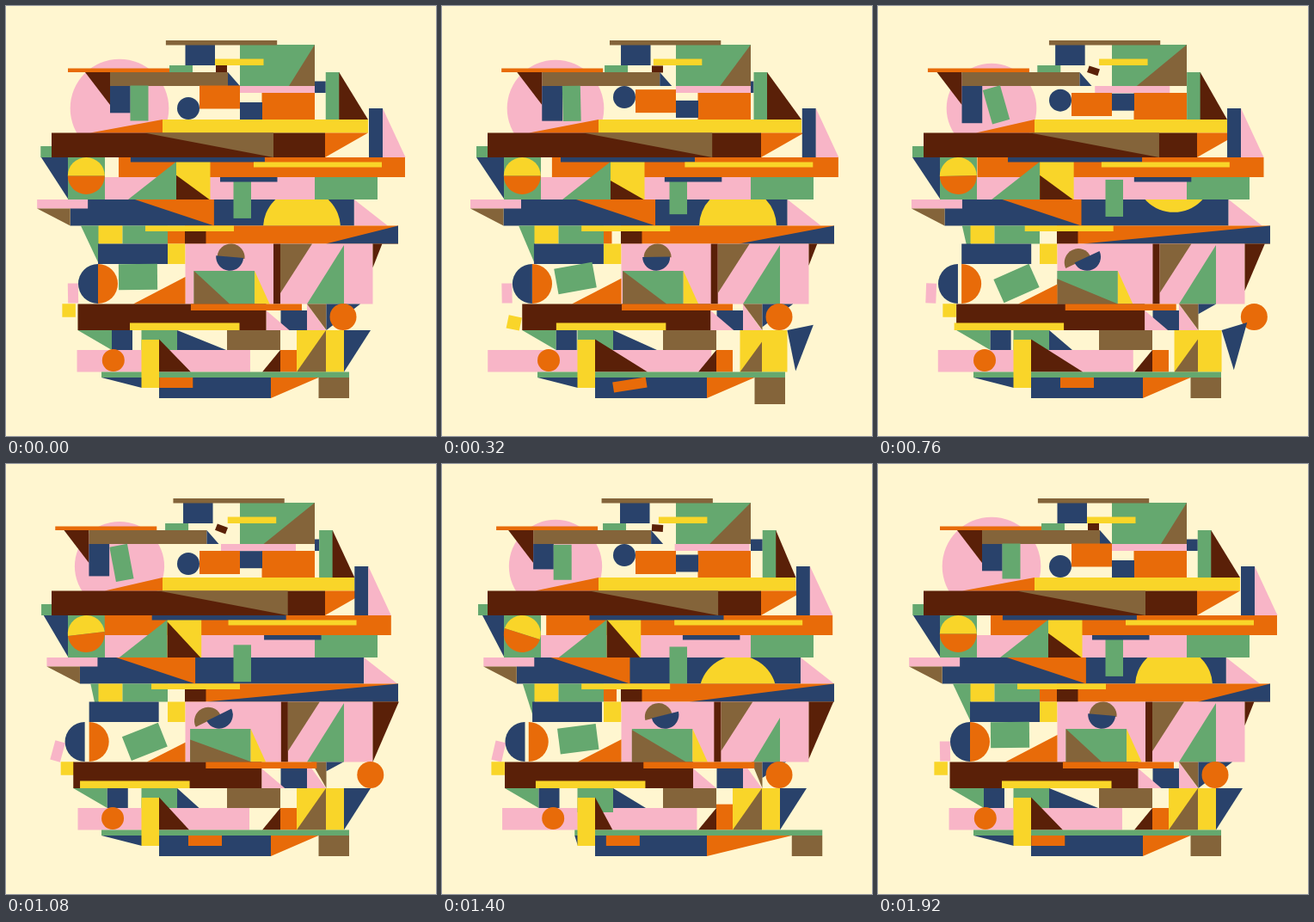
Write an HTML page with a canvas that moves like this. It is 500 px wide and 500 px high and loops after 1960 ms.

```html
<!DOCTYPE html>
<html>
<head>
<meta charset="utf-8">
<style>
html, body { margin: 0; width: 100%; height: 100%; overflow: hidden; background: #fff6d0; }
canvas { display: block; }
</style>
</head>
<body>
<canvas id="stage" width="500" height="500"></canvas>
<script>
const g = document.getElementById('stage').getContext('2d');
const cream = '#fff6d0', navy = '#29426b', orange = '#e86b09', pink = '#f8b5c7', green = '#65a86f',
  yellow = '#f9d529', brown = '#84643a', maroon = '#5a2008';
const LOOP = 1960, CYCLE = 1920;
let now = 0;

const clamp = x => Math.max(0, Math.min(1, x));
const ease = x => x < .5 ? 2 ** 1.4 * x ** 2.4 : 1 - 2 ** 1.4 * (1 - x) ** 2.4;
const step = (from, to) => ease(clamp((now - from) / (to - from)));

// Rests at a, reaches b at the peak time, and takes span ms each way
function sway(a, b, peak = 960, span = 960, cycle = CYCLE) {
  const d = ((now - peak) % cycle + cycle) % cycle;
  return a + (b - a) * ease(clamp(1 - Math.min(d, cycle - d) / span));
}

// One turn with a wind-up and an overshoot
function spin(from, length) {
  const x = clamp((now - from) / length), c = 2.59;
  const back = u => u * u * ((c + 1) * u - c) / 2;
  return 360 * (x < .5 ? back(2 * x) : 1 - back(2 - 2 * x));
}

function box(c, x0, y0, x1, y1) {
  g.fillStyle = c;
  g.fillRect(x0, y0, x1 - x0, y1 - y0);
}
const bar = (c, x, y0, w, y1) => box(c, x, y0, x + w, y1);
function poly(c, ...p) {
  g.fillStyle = c;
  g.beginPath();
  for (let i = 0; i < p.length; i += 2) g.lineTo(p[i], p[i + 1]);
  g.fill();
}
function disc(c, x, y, r) {
  g.fillStyle = c;
  g.beginPath();
  g.arc(x, y, r, 0, 7);
  g.fill();
}
// Half disc whose bulge points up at 0 degrees
function half(c, x, y, r, deg) {
  const a = deg * Math.PI / 180;
  g.fillStyle = c;
  g.beginPath();
  g.arc(x, y, r, a - Math.PI, a);
  g.fill();
}
function turned(x, y, deg, paint) {
  g.save();
  g.translate(x, y);
  g.rotate(deg * Math.PI / 180);
  paint();
  g.restore();
}
const tilt = (c, x, y, w, h, deg) => turned(x, y, deg, () => box(c, -w / 2, -h / 2, w / 2, h / 2));

function drawRoof() {
  disc(pink, 132, 119, sway(57.3, 52));
  bar(navy, sway(208.5, 206), 45, 34.5, 69);
  box(green, 272, 45, 359, 93);
  poly(brown, 359, 45, 359, 93, sway(329, 299), 93);
  bar(yellow, sway(243, 258), 61.5, 56.5, 69);
  bar(brown, sway(184, 199, 690), 40, 129.3, 45.5);
  bar(green, sway(190, 185), 69, 27, 77);
  tilt(maroon, 250.5, sway(73, 75.5), 13, 8, sway(0, 22, 960, 640));
  bar(orange, sway(72, 57), 72.5, 118, 77);

  const x = sway(121, 96);
  poly(maroon, x - 29, 77, x, 77, x, 115);
  bar(brown, x, 77, 137, 93);
  poly(navy, x + 137, 77, x + 151, 93, x + 137, 93);
  poly(orange, 182, 132, 182, 147.5, sway(98, 115), 147.5);
  bar(navy, x, 93, 23.7, sway(121.5, 136.5, 640));
  tilt(green, x + sway(34, 40, 810, 640), sway(113, 115), 21, 41, sway(0, -16, 810, 640));
  disc(navy, 212, sway(106, 119, 0, 330, CYCLE / 2), 13);
  const y = Math.min(101, sway(92.5, 117));
  box(orange, 225, y, 272, y + 27);
  bar(pink, sway(272, 248, 945, 570), 93, 87, 101);

  const p = sway(374, 359, 670);
  box(navy, 359, 87.5, p, 101);
  bar(green, p, 77, 16, 132);
  poly(maroon, p + 15.5, 77, p + 15.5, 132, sway(421, 405), 132);
  box(orange, 297.5, 101, 359, 132);
  const d = sway(112, 101);
  box(navy, 272, d, 298, d + 20);
}

function drawShelves() {
  box(yellow, 182, 132, sway(421, 405), 147.5);
  box(maroon, 53, 147.5, 371, 176);
  const b = sway(311, 328);
  poly(brown, b - 150, 147.5, b, 147.5, b, 176);
  poly(orange, 371, 147.5, 421, 147.5, 371, 176);
  const n = sway(422, 405);
  box(cream, n + 16, 140, 430, 176);
  bar(navy, n, 119, 16, 176);
  poly(pink, n + 16, 119, n + 16, 176, n + 42.5, 176);

  box(green, sway(40, 42, 1420, 700), 163, 53, 176);
  poly(navy, sway(40, 47, 1420, 700), 176, 72, 176, 72, 224);
  box(pink, 115, 199, 359, 225);
  box(green, 72, 176, 115, 225);
  bar(orange, sway(131, 114.5), 176, 333, 199);
  const a = spin(730, 1000);
  half(yellow, 93.3, 197.5, 21.5, a);
  half(orange, 93.3, 197.5, 21.5, a + 180);
  const x = sway(198, 187.5);
  poly(green, x, 181, x, 225, x - 56, 225);
  bar(yellow, x, 181, 39.5, 225);
  poly(maroon, x, sway(203, 181, 1340), x, 225, x + 38.5, 225);
  bar(navy, sway(138, 172, 1290), 176, 156, 181.5);
  bar(yellow, sway(288, 258), 181.5, 149, 187.5);
  box(green, 359, 199, 432, 225);
}

function drawWaist() {
  const p = sway(33, 48.5, 1290), end = p + 368.7, r = sway(248, 218, 1290);
  box(navy, p + 38.5, 225, end, 255.5);
  poly(orange, r - 92, 225, r, 225, r, 255.5);
  bar(pink, p, 225, 59, 235.5);
  poly(brown, p, 235.5, p + 38.5, 235.5, p + 38.5, 255.5);
  poly(pink, end, 225, end, 255.5, end + 39, 255.5);

  // The sun leaves at the top of the strip and returns from below
  g.save();
  g.beginPath();
  g.rect(290, 225, 110, 30.5);
  g.clip();
  disc(yellow, 344, now < 1100 ? 258 - 80 * step(200, 1060) : 300 - 42 * step(1120, 1560), 45);
  g.restore();

  const y = sway(199, 212.5, 1380);
  box(green, 264.5, y, 285, y + 43);
  bar(navy, sway(249, 301), 199, 66.5, 204.5);

  poly(green, sway(87, 98.5), 255.5, 108, 255.5, 108, 300);
  box(yellow, 107.5, 255.5, 135.5, 276.5);
  box(green, 135.5, 255.5, 188, 276.5);
  bar(orange, 188, 262, Math.max(0, sway(20, -22, 820, 800)), 276.5);
  box(orange, 208, 255.5, 456, 276.5);
  poly(navy, sway(372, 230), 276.5, 456, 255.5, 456, 276.5);
  box(maroon, 208, 262, 232.5, 276.5);
  bar(yellow, sway(162, 171, 860, 620), 255.5, 103, 262);
}

function drawPanel() {
  bar(navy, sway(107, 96, 940, 680), 276.5, 81, 300);
  box(yellow, 188, 276.5, 208.5, 300);
  box(pink, 208.5, 276.5, 426.5, 346.5);
  const x = sway(311, 320);
  bar(maroon, x, 276.5, 8, 346.5);
  poly(brown, x + 8, 276.5, x + 45, 276.5, x + 8, 334);
  const shrink = step(1080, 1300) - step(1600, 1900);
  poly(green, 393, 278 + 17 * shrink, 393, 346.5, 350 + 12 * shrink, 346.5);
  poly(maroon, 426.5, 276.5, sway(436, 457, 1170), 276.5, 426.5, sway(301, 347, 1170));

  const q = sway(221.5, 208, 620);
  bar(green, q, 308, 70.5, 346.5);
  poly(brown, q, sway(308, 321, 980, 560), q, 346.5, q + sway(41, 72, 960, 1100), 346.5);
  poly(yellow, q + 70.5, 308, q + 70.5, 346.5, q + 88, 346.5);
  const a = sway(5, -27);
  half(brown, sway(262, 232.5, 850), sway(292.5, 299, 960, 700), 16, a);
  half(navy, sway(262, 243, 720), 291.7, 16, a + 180);

  tilt(pink, sway(78, 60, 1000), 334, 12, 23, sway(-1, 16, 1190, 640));
  half(navy, sway(107, 91.5, 1000), 323, 23, -90);
  half(orange, sway(107, 96.5), 323, 23, 90);
  poly(orange, 208.5, sway(315, 324), 208.5, 346.5, sway(148, 164), 346.5);
  tilt(green, sway(153.5, 161.5), sway(315, 323), 45, 30, sway(0, -24, 830));
}

function drawBase() {
  const b = sway(73, 94, 480), e = b + 219;
  tilt(yellow, sway(65, 85, 520), sway(354, 368.5, 350, 360), 15.5, 15.5, sway(0, 12, 350, 360));
  box(navy, 319.5, 354, 350, 377);
  poly(pink, e, 354, e, 377, e + 27, 377);
  box(maroon, b, 346.5, e, 377);
  poly(pink, 350, 346.5, 350, 377, 372, 377);
  poly(brown, sway(350, 360, 1340, 520), 346.5, 372.5, 346.5, 372.5, 377);
  poly(navy, 372.5, 346.5, sway(412, 392), 346.5, 372.5, sway(377, 357));
  disc(orange, sway(392, 443, 880, 450), 361.5, 15.5);
  bar(orange, sway(209, 234.5, 1310), 346.5, 129, 354);
  bar(yellow, sway(144, 85), 368.5, 127.5, 377);

  poly(green, b, 377, b + 39.5, 377, b + 39.5, 400);
  bar(navy, b + 39.5, 377, 24, 400);
  poly(navy, 199, 377, sway(256, 224), 400, 199, 400);
  box(brown, 257, 377, 319, 400);
  const l = sway(84, 50, 460, 560) - sway(0, 14, 1430, 420);
  box(pink, l, 400, 366.5 - l, 425.5);
  box(green, 157.5, 377, 199, sway(400, 410, 1560, 320));
  disc(orange, sway(124, 130, 1550, 520), 412, 13);
  poly(maroon, 178, 387.5, 178, 425.5, sway(198, 242, 530), 425.5);
  poly(maroon, 319, 400, 319, 425.5, 298, 425.5);
  box(orange, 319, sway(400, 377, 1600, 300), 338, 425.5);

  const out = sway(0, 12, 520, 500);
  box(yellow, 338 + out, 377, 393 + out, 425.5);
  poly(brown, 372, 377 + 1.6 * out, 372, 425.5, 338 + out, 425.5);
  turned(393 + out, 377, sway(0, -23, 570, 500), () => poly(navy, 0, 0, 31, 0, 0, 48.5));

  const q = sway(111, 158, 1500, 430), s = q + 252.5;
  poly(navy, q, 432, 158, 432, 158, 444);
  box(navy, 178, 432, 308, 456);
  poly(orange, 308, 432, s, 432, 308, 456);
  bar(brown, s, 432, 35.5, sway(456, 463, 330, 300));
  bar(green, q, 425.5, 288, 432);
  box(yellow, 157.5, 388, 178, 444);
  tilt(orange, Math.min(231.5, sway(196.5, 245, 820)), sway(438, 440.5, 340, 320), 39, 12,
    sway(0, -9, 340, 320));
}

function draw() {
  now = Math.min(CYCLE, Math.floor(performance.now() % LOOP / 40) * 40);
  box(cream, 0, 0, 500, 500);
  drawRoof();
  drawShelves();
  drawWaist();
  drawPanel();
  drawBase();
  requestAnimationFrame(draw);
}
draw();
</script>
</body>
</html>
```
